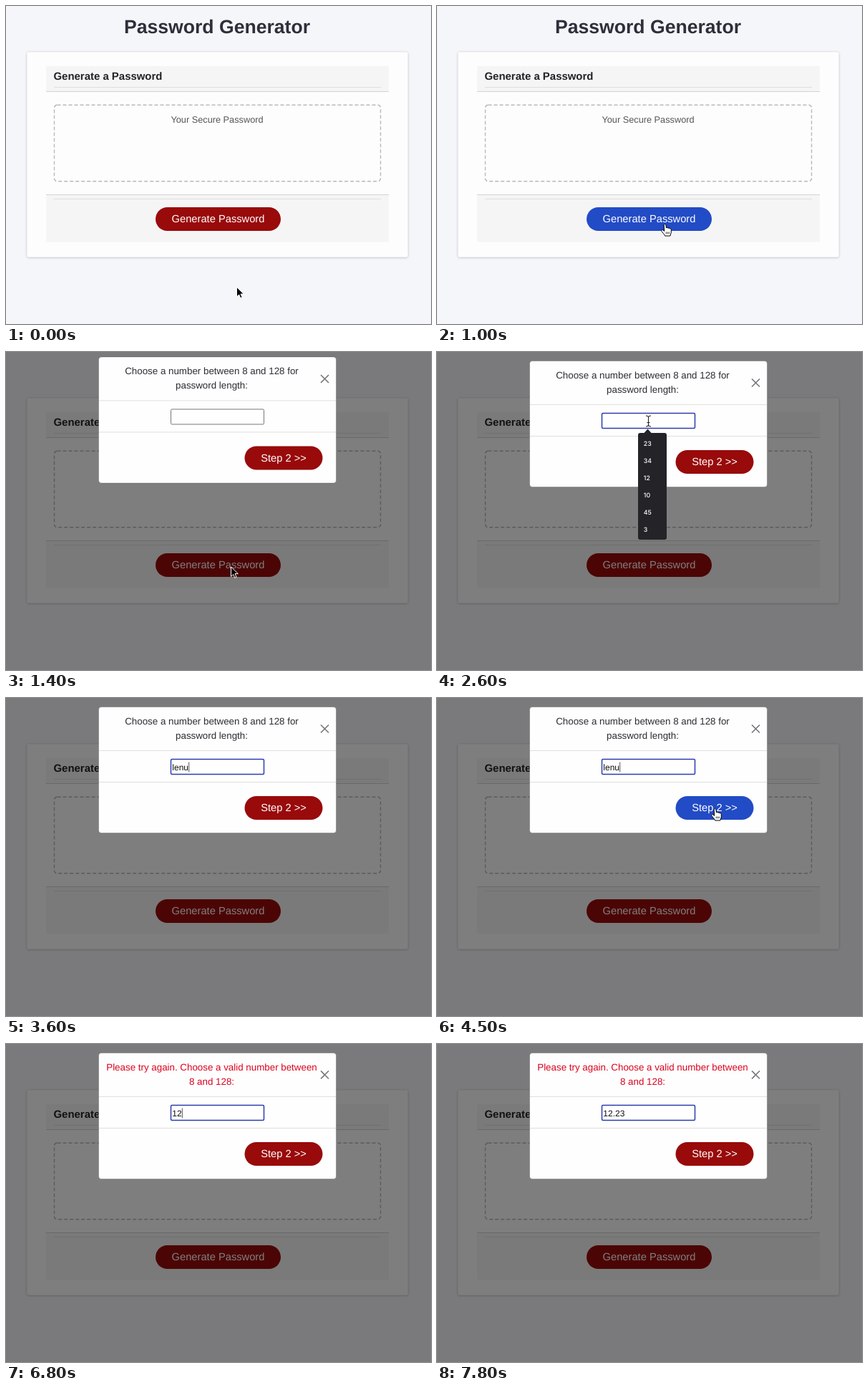
Animation of 594 by 444 pixels, one loop 8 s. Source, as an HTML page:

```html
<!DOCTYPE html>
<html lang="en">
<head>
<meta charset="utf-8">
<title>Password Generator</title>
<style>
  html, body { margin: 0; width: 100%; height: 100%; overflow: hidden; background: #f5f6fa; }
  svg { display: block; width: 594px; height: 444px; font-family: "Liberation Sans", Arial, sans-serif; text-rendering: geometricPrecision; }
  .mid { text-anchor: middle; }
  .bold { font-weight: 700; }
  .label { font-size: 14.7px; fill: #fff; text-anchor: middle; }
  .small { font-size: 12.75px; fill: #555; text-anchor: middle; }
  .ask { font-size: 13.35px; text-anchor: middle; }
  .rule { stroke: #dfdfe1; }
  .edge { stroke: #d3d3d6; }
</style>
</head>
<body>
<svg viewBox="0 0 594 444">
  <defs>
    <filter id="shade" x="-5%" y="-5%" width="110%" height="112%">
      <feDropShadow dx="0" dy="0.5" stdDeviation="1.5" flood-opacity=".32"/>
    </filter>
  </defs>
  <rect width="594" height="444" fill="#f5f6fa"/>
  <text class="mid bold" x="295" y="38" font-size="26.6" fill="#2d303a">Password Generator</text>
  <rect x="29.5" y="64.5" width="532" height="286" rx="2" fill="#fdfdfe" filter="url(#shade)"/>
  <path d="M56 84H535V120H56ZM56 263H535V329.5H56Z" fill="#f5f5f6"/>
  <path class="edge" d="M56 119.5H535M56 263.5H535"/>
  <path class="rule" d="M67 113.5H524M67 269.5H524"/>
  <text class="bold" x="66.5" y="103.3" font-size="14.94" fill="#222327">Generate a Password</text>
  <rect x="67.5" y="138.3" width="456" height="106.4" rx="4" fill="none" stroke="#b8b8c0" stroke-width="1.4" stroke-dasharray="5 3"/>
  <text id="status" class="small" x="295" y="163"></text>
  <rect id="make" x="209" y="281" width="175" height="33" rx="16.5"/>
  <text class="label" x="296.5" y="302.3">Generate Password</text>

  <rect id="veil" width="594" height="444"/>
  <g id="modal">
    <rect x="129.5" y="12.5" width="332" height="176" rx="4" fill="#fefefe" stroke="#000" stroke-opacity=".2"/>
    <path class="rule" d="M130 73.5H461M130 117.5H461"/>
    <g id="ask" class="ask">
      <text id="line1" x="287.5" y="37"></text>
      <text id="line2" x="287.5" y="57"></text>
    </g>
    <path d="M440 37.5L451 48.5M451 37.5L440 48.5" stroke="#75757a" stroke-width="1.6"/>
    <rect id="field" x="230.5" y="85.5" width="130" height="21" rx="1.5" fill="#fff"/>
    <text id="value" x="232.3" y="100.5" font-size="12" fill="#111"></text>
    <path id="caret" stroke="#444" stroke-width=".9"/>
    <rect id="next" x="333.5" y="137" width="109" height="33" rx="16.5"/>
    <text class="label" x="388" y="158.3">Step 2 &gt;&gt;</text>
  </g>
  <g id="list" font-family="Inter, sans-serif" font-size="8.8" font-weight="500" fill="#fff">
    <path d="M289 113.5L294.5 107.5L300 113.5Z" fill="#242328"/>
    <rect x="281" y="113" width="40" height="149" rx="3" fill="#242328"/>
  </g>

  <g id="arrow"><path d="M0 0V13.5L3.2 10.5L5.3 15.3L7.6 14.3L5.5 9.6H9.8Z" fill="#000" stroke="#fff" stroke-linejoin="round"/></g>
  <g id="hand"><path d="M-1.4 .8C-1.4 -.8 1.2 -.8 1.4 .8L2 5C2.4 4 4.4 4.2 4.5 5.4C5 4.6 6.6 4.8 6.8 6C7.4 5.4 8.8 5.8 8.8 7.2V11L7.4 16H.2C-.8 13.6 -3.2 11.4 -4.6 9.4C-5.4 8 -3.6 7 -2.4 8L-.8 9.4Z" fill="#fff" stroke="#000" stroke-linejoin="round"/><path d="M1.8 10.5V13.2M3.8 10.5V13.2M5.8 10.5V13.2" stroke="#000" stroke-width=".8"/></g>
  <g id="beam"><path d="M-3.5 -7.5Q0 -7.5 0 -5V5Q0 7.5 -3.5 7.5M3.5 -7.5Q0 -7.5 0 -5V5Q0 7.5 3.5 7.5M-2 2H2" fill="none" stroke="#222" stroke-width="1.1"/></g>
</svg>
<script>
const el = id => document.getElementById(id);
const set = (id, attrs) => { for (const k in attrs) el(id).setAttribute(k, attrs[k]); };
const show = (id, on) => set(id, { display: on ? "inline" : "none" });
const clamp = v => Math.min(1, Math.max(0, v));
const ramp = (t, a, b) => clamp((t - a) / (b - a));
const RED = "#990a0b", BLUE = "#224bc6";

["23", "34", "12", "10", "45", "3"].forEach((n, i) => {
  el("list").insertAdjacentHTML("beforeend", `<text x="288.8" y="${131 + 24 * i}">${n}</text>`);
});

// Pointer stops: time, x, y
const stops = [
  [0, 322.5, 392.5], [100, 322.5, 392.5], [800, 318.5, 305], [1000, 318.5, 305],
  [1200, 314.5, 300], [1500, 314.5, 300], [2100, 295.5, 96.5], [3800, 295.5, 96.5],
  [4400, 388.5, 155], [4700, 388.5, 155], [5500, 293, 98.5], [8000, 293, 98.5]
];
// Field contents: time, value
const keys = [
  [2100, ""], [2900, "l"], [3100, "le"], [3200, "len"], [3400, "lenu"],
  [5900, "len"], [6000, "le"], [6200, "l"], [6300, ""],
  [6600, "1"], [6800, "12"], [7000, "12."], [7100, "12.2"], [7300, "12.23"]
];

function pointer(t) {
  const i = Math.max(1, stops.findIndex(s => s[0] > t));
  const [t0, x0, y0] = stops[i - 1], [t1, x1, y1] = stops[i];
  const p = ramp(t, t0, t1), e = p * p * (3 - 2 * p);
  return { x: x0 + (x1 - x0) * e, y: y0 + (y1 - y0) * e };
}

function inside(id, { x, y }) {
  const b = el(id);
  const at = k => +b.getAttribute(k);
  return x >= at("x") && x <= at("x") + at("width") && y >= at("y") && y <= at("y") + at("height");
}

function draw(time) {
  const t = Math.floor(time / 100) * 100;
  const open = t >= 1100, focus = t >= 2100, error = t >= 4700;
  const typing = (t >= 2900 && t < 3800) || t >= 5900;
  const pos = pointer(t);
  const overMake = !open && inside("make", pos);
  const overNext = t >= 1500 && inside("next", pos);
  const overField = t >= 1500 && inside("field", pos);

  el("status").textContent = open ? "Loading..." : "Your Secure Password";
  set("make", { fill: overMake ? BLUE : RED });
  set("veil", { opacity: 0.5 * ramp(t, 1050, 1210) });
  const slide = 1 - (1 - ramp(t, 1200, 1500)) ** 2;
  set("modal", { opacity: ramp(t, 1200, 1350), transform: `translate(0 ${-50 * (1 - slide)})` });

  set("ask", { fill: error ? "#d9041e" : "#2b2d33" });
  el("line1").textContent = error ? "Please try again. Choose a valid number between" : "Choose a number between 8 and 128 for";
  el("line2").textContent = error ? "8 and 128:" : "password length:";

  const [since, value] = keys.filter(k => k[0] <= t).pop() || [0, ""];
  el("value").textContent = value;
  set("field", { stroke: focus ? "#2c3daf" : "#77777c", "stroke-width": focus ? 1.5 : 1 });
  show("caret", focus && Math.floor((t - since) / 500) % 2 === 0);
  const end = 233 + (value ? el("value").getComputedTextLength() : 0);
  set("caret", { d: `M${end} 89.5V103.5` });
  set("next", { fill: overNext ? BLUE : RED });
  show("list", focus && t < 2900);

  const kind = typing ? "" : overField ? "beam" : overMake || overNext ? "hand" : "arrow";
  for (const id of ["arrow", "hand", "beam"]) {
    show(id, id === kind);
    set(id, { transform: `translate(${pos.x} ${pos.y})` });
  }
}

function tick() {
  draw(performance.now() % 8000);
  requestAnimationFrame(tick);
}
tick();
</script>
</body>
</html>
```
